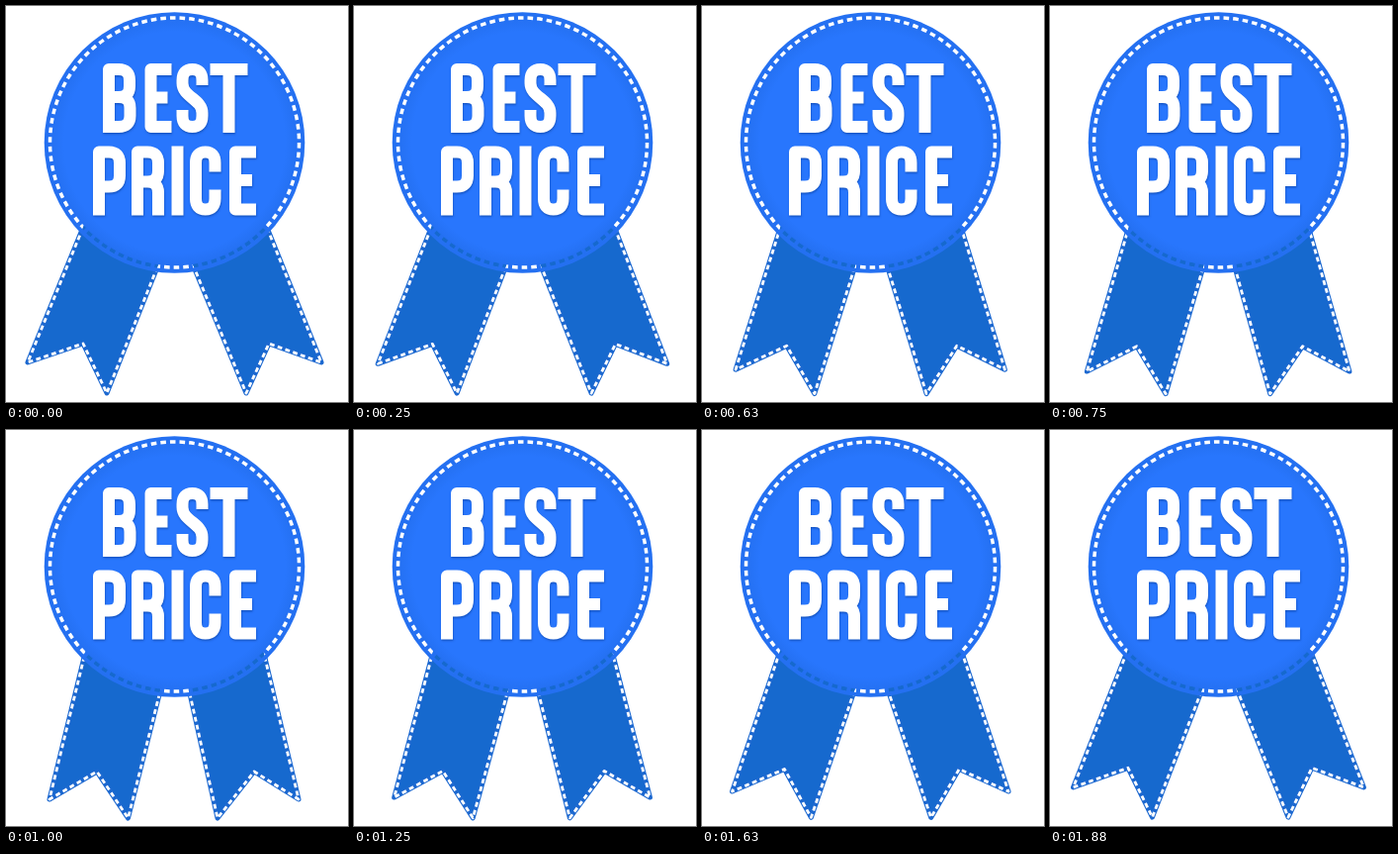
Write an HTML page with a canvas that moves like this. It is 346 px wide and 400 px high and loops after 2.01 s.

```html
<!DOCTYPE html>
<html lang="en">
<head>
<meta charset="utf-8">
<title>Best price</title>
<style>
  html, body { margin: 0; width: 100%; height: 100%; overflow: hidden; background: #fff; }
  canvas { display: block; width: 346px; height: 400px; }
</style>
</head>
<body>
<canvas width="346" height="400" role="img" aria-label="BEST PRICE"></canvas>
<script>
const ctx = document.querySelector('canvas').getContext('2d');
const LOOP = 2010, STEP = 125;
const CENTER = [170.5, 138], RADIUS = 131.8, SEAM = 126;
const FACE = '#2876fd', RIM = '#2470f1', RIBBON = '#1669ce', EDGE = '#1c68d0';

// Swing per step: 0 is spread wide, 1 is drawn in.
const SWING = [0, .03, .1, .23, .39, .55, .7, .86, 1, .98, .85, .71, .57, .39, .21, .07];

// Seam corners: outer top, outer corner, notch, inner tip, inner top.
const RIBBONS = [
  { wide: [[84, 209], [22, 360], [78, 341], [102, 391], [159, 249]],
    drawn: [[85, 205], [44, 373], [92, 345], [123.5, 392], [161, 244]] },
  { wide: [[258, 209], [319, 360], [266, 341], [243, 391], [184, 249]],
    drawn: [[256, 205], [296, 373], [251, 345], [214, 392], [181, 244]] }
];

// Monoline letters on a cap height of 70.
const BOWL = 'M6 70V6H16Q27 6 27 17V';
const GLYPHS = {
  B: BOWL + '23Q27 34 16 34H6M16 34Q27.5 34 27.5 45V53Q27.5 64 16 64H6',
  E: 'M27 6H6V64H27M6 34.5H23',
  S: 'M26.5 22V17Q26.5 6 16.5 6Q6.5 6 6.5 17V20C6.5 34 26.5 36 26.5 50V53Q26.5 64 16.5 64Q6.5 64 6.5 53V47',
  T: 'M0 6H38M19 0V70',
  P: BOWL + '30Q27 41 16 41H6',
  R: BOWL + '25Q27 36 16 36H6M16 36Q27 36 27 47V70',
  I: 'M6 0V70',
  C: 'M25.5 26V17Q25.5 6 15.7 6Q6 6 6 17V53Q6 64 15.7 64Q25.5 64 25.5 53V44'
};

const lettering = new Path2D();
function addWord(word, y, lefts) {
  [...word].forEach((letter, i) =>
    lettering.addPath(new Path2D(GLYPHS[letter]), new DOMMatrix().translate(lefts[i], y)));
}
addWord('BEST', 58, [98, 140.5, 172, 206.5]);
addWord('PRICE', 141.5, [88, 127, 167.5, 186, 226]);

function circle(radius) {
  const path = new Path2D();
  path.arc(...CENTER, radius, 0, Math.PI * 2);
  return path;
}
const badge = circle(RADIUS), seam = circle(SEAM);
const pitch = 2 * Math.PI * SEAM / 82;
const badgeFill = ctx.createRadialGradient(...CENTER, 112, ...CENTER, SEAM);
badgeFill.addColorStop(0, FACE);
badgeFill.addColorStop(1, RIM);

function stroke(path, color, width, dashes = []) {
  ctx.setLineDash(dashes);
  ctx.strokeStyle = color;
  ctx.lineWidth = width;
  ctx.stroke(path);
}

function ribbonPath({ wide, drawn }, amount) {
  const path = new Path2D();
  wide.forEach(([x, y], i) => {
    path.lineTo(x + (drawn[i][0] - x) * amount, y + (drawn[i][1] - y) * amount);
  });
  path.closePath();
  return path;
}

function drawRibbon(path) {
  ctx.fillStyle = RIBBON;
  ctx.fill(path);
  stroke(path, EDGE, 5);
  stroke(path, '#fff', 2.8, [4.8, 3.4]);
}

function drawBadge(ribbons) {
  ctx.fillStyle = badgeFill;
  ctx.fill(badge);
  const dashes = [5.6, pitch - 5.6];
  stroke(seam, '#fff', 3.5, dashes);
  // Ribbons show through the stitch holes.
  for (const path of ribbons) {
    ctx.save();
    ctx.clip(path);
    stroke(seam, RIM, 5);
    stroke(seam, RIBBON, 3.5, dashes);
    ctx.restore();
  }
}

function drawLettering() {
  ctx.save();
  ctx.shadowColor = 'rgba(10, 60, 150, .55)';
  ctx.shadowBlur = 2;
  ctx.shadowOffsetX = 0.5;
  ctx.shadowOffsetY = 1.5;
  stroke(lettering, '#fff', 12);
  ctx.restore();
}

function frame(now) {
  const step = Math.min(SWING.length - 1, Math.floor(now % LOOP / STEP));
  const ribbons = RIBBONS.map(ribbon => ribbonPath(ribbon, SWING[step]));
  ctx.fillStyle = '#fff';
  ctx.fillRect(0, 0, 346, 400);
  ctx.lineJoin = 'round';
  ribbons.forEach(drawRibbon);
  drawBadge(ribbons);
  drawLettering();
  requestAnimationFrame(frame);
}
frame(performance.now());
</script>
</body>
</html>
```
